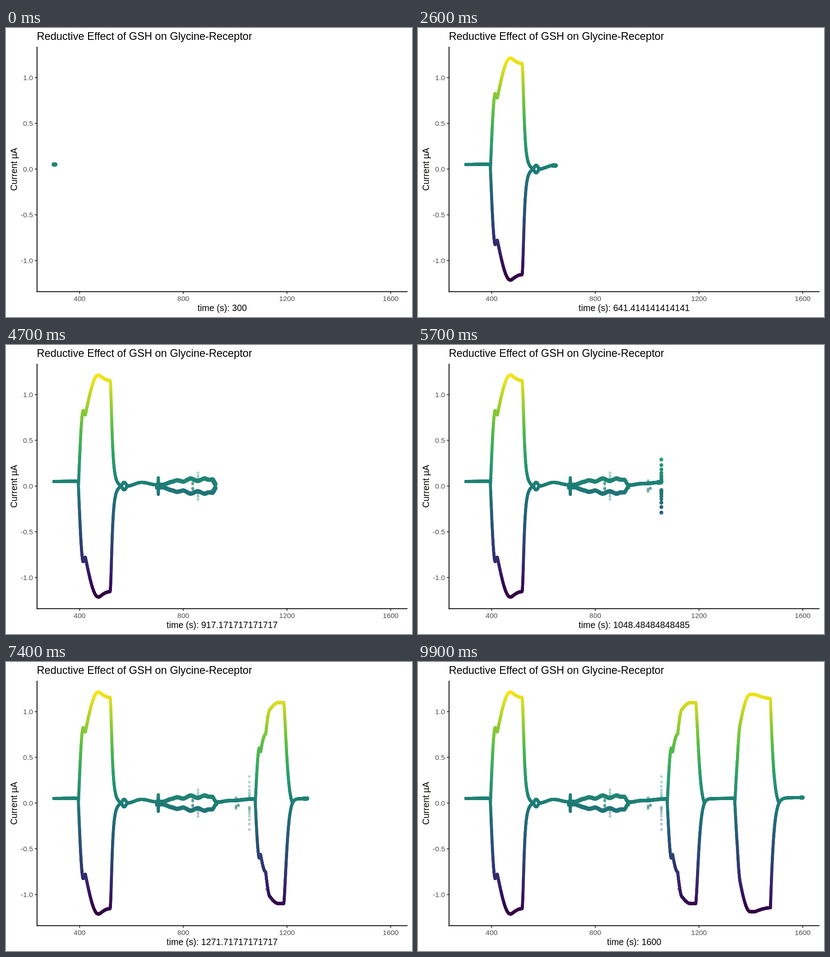
Animation of 885 by 632 pixels, one loop 10000 ms. Source, as an HTML page with a canvas:

```html
<!DOCTYPE html>
<html lang="en">
<head>
<meta charset="utf-8">
<title>Reductive Effect of GSH on Glycine-Receptor</title>
<style>
html, body { margin: 0; width: 100%; height: 100%; overflow: hidden; background: #fff; }
canvas { display: block; }
</style>
</head>
<body>
<canvas id="stage" width="885" height="632"></canvas>
<script>
const WIDTH = 885, HEIGHT = 632, ZERO = 308.5, UNIT = 200;
const REACH = 3.72, STEP = 0.125;
const FONT = '"Liberation Sans", Arial, Helvetica, sans-serif';
const ctx = document.getElementById('stage').getContext('2d');
const xOf = seconds => 160.5 + (seconds - 400) * 0.565;
const within = (x, from, to) => x >= from && x <= to;
const clamp = (v, low, high) => Math.min(high, Math.max(low, v));

let seed = 7;
const random = () => (seed = seed * 16807 % 2147483647) / 2147483647;

// Ways a response dies away after the wash-out.
const hill = (half, power) => d => 1 / (1 + (d / half) ** power);
const decay = (span, power) => d => Math.exp(-((d / span) ** power));

// A response is a sum of eased stages (delay, duration, height), then a fall; all in pixels.
const pulses = [
  { on: 157.5, off: 226.5, fall: hill(5, 2.35),
    stages: [[0, 11, 175], [11, 4.5, -10.5], [15.5, 28, 83], [46, 23, -11.5]] },
  { on: 543, off: 605.5, fall: decay(8.45, 1.42),
    stages: [[0, 9.5, 129.5], [9.5, 2.5, -8], [12, 11, 38], [23, 10, 55], [33, 18, 14.5]] },
  { on: 690.2, off: 768.2, fall: decay(6.9, 1.1),
    stages: [[0, 12, 151.5], [6, 28, 97], [45, 33, -8]] }
];

function swell(x) {
  let sum = 0;
  for (const { on, off, stages, fall } of pulses) {
    if (x < on) continue;
    const t = Math.min(x, off) - on;
    const level = stages.reduce((h, [delay, span, height]) =>
      h + height * Math.sin(clamp((t - delay) / span, 0, 1) * Math.PI / 2), 0);
    sum += level * fall(Math.max(0, x - off));
  }
  return sum;
}

// Resting level: eased between key points, with a spike and a wavy stretch.
const restKeys = [[104, 10], [157, 10.5], [200, 5], [250, 5], [257, 11.5], [266, 2], [295, 8.5],
  [328, 3], [338, 2.5], [366, 10], [403, 14], [449, 14], [459, 2], [490, 5.5], [541, 9], [841, 12]];

function rest(x) {
  const i = Math.max(1, restKeys.findIndex(k => k[0] >= x));
  const [x0, y0] = restKeys[i - 1], [x1, y1] = restKeys[i];
  const ease = (1 - Math.cos((x - x0) / (x1 - x0) * Math.PI)) / 2;
  const spike = 15 * Math.exp(-(((x - 332) / 0.5) ** 2));
  const wave = within(x, 365, 441) ? 2.5 * Math.sin((x - 365) / 4.8) : 0;
  return y0 + (y1 - y0) * ease + spike + wave;
}

function reading(x) {
  const level = rest(x) - swell(x);
  const jitter = within(x, 328, 459) ? 1.5 : within(x, 459, 541) ? 0.8 : 0.3;
  return {
    height: Math.abs(level) + (random() * 2 - 1) * jitter,
    mirrored: level < 0 || within(x, 250, 266) || within(x, 328, 459)
  };
}

const palette = ['350043', '37206a', '2e4374', '265f7a', '217d78', '2a9f6c', '55bb4a', 'a3d02f', 'f8e41d']
  .map(h => [0, 2, 4].map(i => parseInt(h.slice(i, i + 2), 16)));

function colour(height) {
  const p = clamp((height / 243 + 1) * 4, 0, 7.999);
  const i = Math.floor(p), f = p - i;
  return `rgb(${palette[i].map((c, k) => Math.round(c + (palette[i + 1][k] - c) * f))})`;
}

const segments = [];
const last = xOf(1600);
for (let x = xOf(300), a = reading(x); x < last; x += STEP) {
  const nx = x + STEP, b = reading(nx);
  for (const s of b.mirrored ? [-1, 1] : [1]) {
    segments.push({
      x, nx, y: ZERO - s * a.height, ny: ZERO - s * b.height,
      fill: colour(s * (a.height + b.height) / 2)
    });
  }
  a = b;
}

// Columns of stray readings thinning out from zero: x, farthest height, count.
const strays = [];
for (const [x, far, count] of [[407, 8, 4], [418.5, 29, 6], [501.5, 12.5, 4], [506.5, 6, 3],
  [530.5, 58, 9], [567.5, 188.5, 1]]) {
  for (let k = 0; k < count; k++) {
    const h = far * 0.79 ** k;
    strays.push({ x, h }, { x, h: -h });
  }
}

function trace(c, list, width) {
  c.lineCap = 'round';
  c.lineWidth = width;
  for (const s of list) {
    c.strokeStyle = s.fill;
    c.beginPath();
    c.moveTo(s.x, s.y);
    c.lineTo(s.nx, s.ny);
    c.stroke();
  }
}

const trail = document.createElement('canvas');
trail.width = WIDTH;
trail.height = HEIGHT;
trace(trail.getContext('2d'), segments, 6.4);

function drawStrays(now) {
  for (const { x, h } of strays) {
    if (x > now + REACH) continue;
    const live = x >= now - REACH;
    ctx.globalAlpha = live ? 1 : 0.3;
    ctx.fillStyle = ctx.strokeStyle = colour(h);
    ctx.lineWidth = 1;
    ctx.beginPath();
    ctx.arc(x, ZERO - h, live ? 4.2 : 2.6, 0, 7);
    ctx.fill();
    if (!live) ctx.stroke();
  }
  ctx.globalAlpha = 1;
}

function label(text, x, y, size, align, fill = '#000') {
  ctx.font = `${size}px ${FONT}`;
  ctx.textAlign = align;
  ctx.fillStyle = fill;
  ctx.fillText(text, x, y);
}

function bar(fill, x, y, w, h) {
  ctx.fillStyle = fill;
  ctx.fillRect(x, y, w, h);
}

function drawAxes(seconds) {
  bar('#000', 66.7, 41, 1.9, 536.5);
  bar('#000', 66.7, 575.6, 808.5, 1.9);
  for (let s = 400; s <= 1600; s += 400) {
    bar('#333', xOf(s) - 0.95, 577, 1.9, 4.4);
    label(s, xOf(s), 596.5, 15.49, 'center', '#4d4d4d');
  }
  for (let v = -1; v <= 1; v += 0.5) {
    const y = ZERO - v * UNIT;
    bar('#333', 62.8, y - 0.95, 4.4, 1.9);
    label(v.toFixed(1), 58.8, y + 5.8, 15.49, 'right', '#4d4d4d');
  }
  label('Reductive Effect of GSH on Glycine-Receptor', 67.2, 26.3, 23.23, 'left');
  label('time (s): ' + parseFloat(seconds.toPrecision(15)), 471.2, 618.8, 19.36, 'center');
  ctx.save();
  ctx.translate(23.5, 309);
  ctx.rotate(-Math.PI / 2);
  label('Current µA', 0, 0, 19.36, 'center');
  ctx.restore();
}

function draw(step) {
  const seconds = 300 + step * 1300 / 99, now = xOf(seconds), edge = now - REACH;
  bar('#fff', 0, 0, WIDTH, HEIGHT);
  drawAxes(seconds);
  ctx.save();
  ctx.beginPath();
  ctx.rect(0, 0, edge, HEIGHT);
  ctx.clip();
  ctx.drawImage(trail, 0, 0);
  ctx.restore();
  drawStrays(now);
  trace(ctx, segments.filter(s => s.x >= edge && s.nx <= now + REACH), 8.8);
}

let start, shown = -1;
function tick(time) {
  start ??= time;
  const step = Math.floor((time - start) % 10000 / 100);
  if (step !== shown) draw(shown = step);
  requestAnimationFrame(tick);
}
requestAnimationFrame(tick);
</script>
</body>
</html>
```
